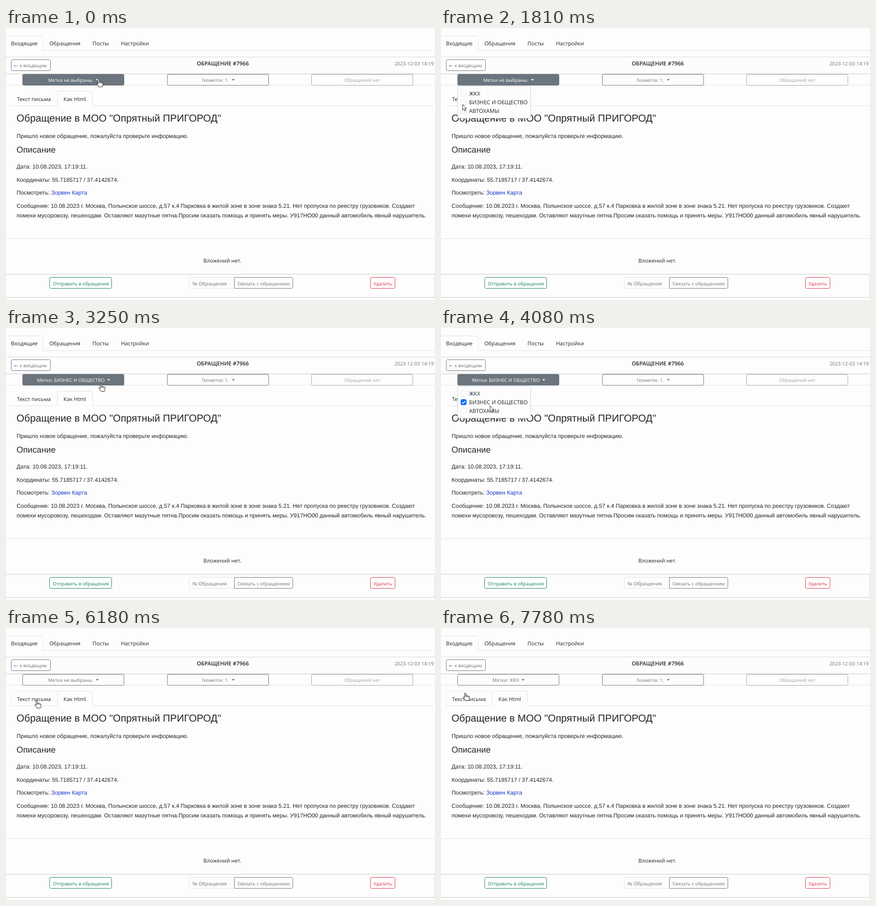
An HTML page that plays this animation: 940 px wide and 596 px high, repeating every 8 s.

```html
<!DOCTYPE html>
<html lang="ru">
<head>
<meta charset="utf-8">
<title>Обращение</title>
<style>
html, body { margin: 0; width: 100%; height: 100%; overflow: hidden; background: #fdfdfd; }
svg { display: block; width: 100%; height: 100%; }
text { font: 11.7px "Open Sans", "Noto Sans", sans-serif; fill: #212529; text-rendering: geometricPrecision; white-space: pre; }
.small text { font-size: 10.2px; fill: #6c757d; }
.small .title { font-size: 11.95px; font-weight: 600; fill: #212529; }
.small .date { font-size: 10.75px; }
.small .arrow { font-family: "DejaVu Sans", sans-serif; }
.small #label { font-size: 10.35px; }
.mail text { font: 12.5px "Liberation Sans", Arial, sans-serif; }
.mail .h3 { font-size: 22px; }
.mail .h4 { font-size: 18.65px; }
.mail .link { fill: #1a38c8; }
.mid { text-anchor: middle; }
.end { text-anchor: end; }
.line { fill: none; stroke: #dee2e6; }
.rule { fill: none; stroke: #c6c7c8; }
.btn { fill: none; stroke: #6c757d; }
.menu text { font-size: 11.95px; }
.small .green { fill: #198754; }
.small .red { fill: #dc3545; }
.pointer { fill: #fff; stroke: #111; stroke-linejoin: round; }
</style>
</head>
<body>
<svg viewBox="0 0 940 596" preserveAspectRatio="none">
  <rect width="940" height="596" fill="#fdfdfd"/>

  <path class="line" d="M0 17.5H77Q81.5 17.5 81.5 22V49.5H940M0 125.5H36M259 125.5H353M576 125.5H669M892 125.5H940M0 461.5H940"/>
  <path class="rule" d="M0 100.5H940M0 539.5H940M0 590.5H940"/>
  <path class="rule" d="M0 63.5H940M939.5 540V590" stroke-opacity=".7"/>
  <text x="11" y="38">Входящие</text>
  <text x="95" y="38">Обращения</text>
  <text x="189.5" y="38">Посты</text>
  <text x="252" y="38">Настройки</text>

  <g class="small">
    <text class="title mid" x="475" y="82">ОБРАЩЕНИЕ #7966</text>
    <text class="date end" x="937.5" y="82">2023-12-03 14:19</text>
    <rect class="btn" x="11.5" y="69.5" width="86" height="24" rx="3"/>
    <text class="arrow" x="17.5" y="86">←</text>
    <text x="30" y="86">к входящим</text>

    <rect id="tags" class="btn" x="36.5" y="101.5" width="222" height="24" rx="2.5"/>
    <text id="label" class="mid" x="142" y="118"></text>
    <path id="caret" d="M-3.3 0h6.6l-3.3 3.4z"/>
    <rect class="btn" x="353.5" y="101.5" width="222" height="24" rx="2.5"/>
    <text class="mid" x="458.5" y="118">Геометок: 1.</text>
    <path d="M494.7 112h6.6l-3.3 3.4z" fill="#6c757d"/>
    <g opacity=".65">
      <rect class="btn" x="669.5" y="101.5" width="222" height="24" rx="2.5"/>
      <text class="mid" x="780.5" y="118">Обращений нет</text>
    </g>

    <rect class="btn" x="95.5" y="546.5" width="136" height="24" rx="3" style="stroke:#198754"/>
    <text class="mid green" x="164" y="563.5">Отправить в обращения</text>
    <path class="line" d="M500 546.5H404.5Q401.5 546.5 401.5 549.5V567.5Q401.5 570.5 404.5 570.5H500"/>
    <text x="408.5" y="563.5" style="font-size:10.6px">№ Обращения</text>
    <path class="btn" d="M500.5 546.5H625.5Q628.5 546.5 628.5 549.5V567.5Q628.5 570.5 625.5 570.5H500.5Z"/>
    <text class="mid" x="564.5" y="563.5">Связать с обращением</text>
    <rect class="btn" x="798.5" y="546.5" width="54" height="24" rx="3" style="stroke:#dc3545"/>
    <text class="mid red" x="825.5" y="563.5">Удалить</text>
  </g>

  <path class="line" d="M11 170.5H112.5V143Q112.5 138.5 117 138.5H185Q189.5 138.5 189.5 143V170.5H937"/>
  <path id="tabHover" class="line" stroke-opacity=".55" d="M11.5 170V143Q11.5 138.5 16 138.5H108Q112.5 138.5 112.5 143"/>
  <text x="24" y="159.5">Текст письма</text>
  <text x="126" y="159.5">Как Html</text>

  <g class="mail">
    <text class="h3" x="23" y="205">Обращение в МОО "Опрятный ПРИГОРОД"</text>
    <text x="23.3" y="241">Пришло новое обращение, пожалуйста проверьте информацию.</text>
    <text class="h4" x="23" y="273">Описание</text>
    <text x="23.3" y="308">Дата: 10.08.2023, 17:19:11.</text>
    <text x="23.3" y="337">Координаты: 55.7185717 / 37.4142674.</text>
    <text x="23.3" y="365">Посмотреть: <tspan class="link">Зорвен Карта</tspan></text>
    <text x="23.3" y="394">Сообщение: 10.08.2023 г. Москва, Полынское шоссе, д.57 к.4 Парковка в жилой зоне в зоне знака 5.21. Нет пропуска по реестру грузовиков. Создают</text>
    <text x="23.3" y="414.5">помехи мусоровозу, пешеходам. Оставляют мазутные пятна.Просим оказать помощь и принять меры. У917НО00 данный автомобиль явный нарушитель.</text>
  </g>
  <text class="mid" x="474" y="514">Вложений нет.</text>

  <g id="menu" class="menu">
    <rect x="36.5" y="127.5" width="160" height="70" rx="4" fill="#fdfdfd" stroke="#cfd0d1"/>
  </g>

  <path id="arrow" class="pointer" stroke-width=".9" d="M.5 .5V13L3.3 10.4 5.2 15 7.2 14.1 5.3 9.6H9Z"/>
  <path id="hand" class="pointer" d="M-1.4 10.5V1.7Q-1.4 .5 0 .5T1.4 1.7V6Q3.9 4.9 4.2 6.8 6.5 5.9 6.9 7.6 9.1 7 9.2 9V12Q9.2 14.5 7.8 17H.6Q-.5 14.5-3.2 11.8-4.6 9.8-3.3 9-2.4 8.6-1.4 10.5ZM1.4 6V9.5M4.2 6.8V9.6M6.9 7.6V9.6"/>
</svg>

<script>
const LOOP = 8000;
const TICK = 127.17, TICK_START = 90; // the pointer moves in ticks
const PRESS = 120, FADE = 200;
const PAPER = [253, 253, 253], GREY = [108, 117, 125], WHITE = [255, 255, 255];
const items = ["ЖКХ", "БИЗНЕС И ОБЩЕСТВО", "АВТОХАМЫ"];

// each visit to the menu toggles one row
const visits = [
  { open: 150, press: 2090, close: 2490, row: 1 },
  { open: 3650, press: 5410, close: 5530, row: 1 },
  { open: 6550, press: 7180, close: 7540, row: 0 }
];

const home = { x: 203, y: 112 };
const glides = [
  { from: 400, to: 860, x: 45, y: 144 },
  { from: 900, to: 1540, x: 47, y: 181 },
  { from: 1540, to: 1740, x: 47, y: 167 },
  { from: 2780, to: 3240, x: 229, y: 116 },
  { from: 3800, to: 4030, x: 107, y: 170 },
  { from: 4080, to: 4280, x: 52, y: 183 },
  { from: 4600, to: 5170, x: 51, y: 163 },
  { from: 5980, to: 6440, x: 226, y: 116 },
  { from: 6550, to: 6900, x: 53, y: 142 }
];

const $ = id => document.getElementById(id);
const show = (el, on) => { el.style.display = on ? "" : "none"; };
const place = (el, x, y) => el.setAttribute("transform", `translate(${x} ${y})`);
const clamp = v => Math.min(1, Math.max(0, v));
const ease = v => v * v * (3 - 2 * v);
const lerp = (a, b, k) => a + (b - a) * k;
const mix = (a, b, k) => `rgb(${a.map((v, i) => Math.round(lerp(v, b[i], k)))})`;

function add(parent, tag, attrs) {
  const el = document.createElementNS("http://www.w3.org/2000/svg", tag);
  for (const key in attrs) el.setAttribute(key, attrs[key]);
  parent.append(el);
  return el;
}

const rows = items.map((name, i) => {
  const menu = $("menu"), y = 144 + i * 18.8, mid = Math.round(y);
  const bar = add(menu, "rect", { x: 37, y: y - 9.3, width: 159, height: 18.8, fill: "#0d6efd" });
  const box = add(menu, "rect", { x: 43.5, y: mid - 6.5, width: 12, height: 12, rx: 3 });
  const check = add(menu, "path", {
    d: `M46.5 ${mid - .3}l2.2 2.3 4-4.4`,
    fill: "none", stroke: "#fff", "stroke-width": 1.6, "stroke-linecap": "round"
  });
  const text = add(menu, "text", { x: 61.5, y: y + 4.3 });
  text.textContent = name;
  return { bar, box, check, text };
});

function pointerAt(t) {
  const now = TICK_START + Math.floor((t - TICK_START) / TICK) * TICK;
  return glides.reduce((p, g) => {
    const k = ease(clamp((now - g.from) / (g.to - g.from)));
    return { x: lerp(p.x, g.x, k), y: lerp(p.y, g.y, k) };
  }, home);
}

function menuAt(t) {
  const state = { open: false, picked: -1, pressed: -1, shade: 0 };
  for (const { open, press, close, row } of visits) {
    if (t < open) break;
    state.open = t < close;
    state.pressed = t >= press && t < press + PRESS ? row : -1;
    if (t >= press + PRESS) state.picked = state.picked === row ? -1 : row;
    state.shade = 1 - clamp((t - close) / FADE);
  }
  return state;
}

function draw(t) {
  const { open, picked, pressed, shade } = menuAt(t);
  const { x, y } = pointerAt(t);
  const onButton = x > 36 && x < 259 && y > 101 && y < 126;
  const onTab = !open && x > 11 && x < 112 && y > 138 && y < 170;
  const fill = open || onButton ? 1 : shade;

  const label = $("label"), caret = $("caret");
  label.textContent = picked < 0 ? "Метки не выбраны." : "Метки: " + items[picked];
  place(caret, 142 + label.getComputedTextLength() / 2 + 8.7, 112);
  $("tags").style.fill = mix(PAPER, GREY, fill);
  label.style.fill = caret.style.fill = mix(GREY, WHITE, fill);

  show($("menu"), open);
  rows.forEach(({ bar, box, check, text }, i) => {
    const on = i === picked, down = i === pressed;
    show(bar, down);
    show(check, on);
    box.style.fill = on ? "#0d6efd" : "#fdfdfd";
    box.style.stroke = on ? "#0d6efd" : "#e1e4e8";
    text.style.fill = down ? "#fff" : "#212529";
  });

  const overLink = onButton || onTab;
  show($("tabHover"), onTab);
  show($("hand"), overLink);
  show($("arrow"), !overLink);
  place($(overLink ? "hand" : "arrow"), x, y);
}

const start = performance.now();
function tick() {
  draw((performance.now() - start) % LOOP);
  requestAnimationFrame(tick);
}
tick();
</script>
</body>
</html>
```
